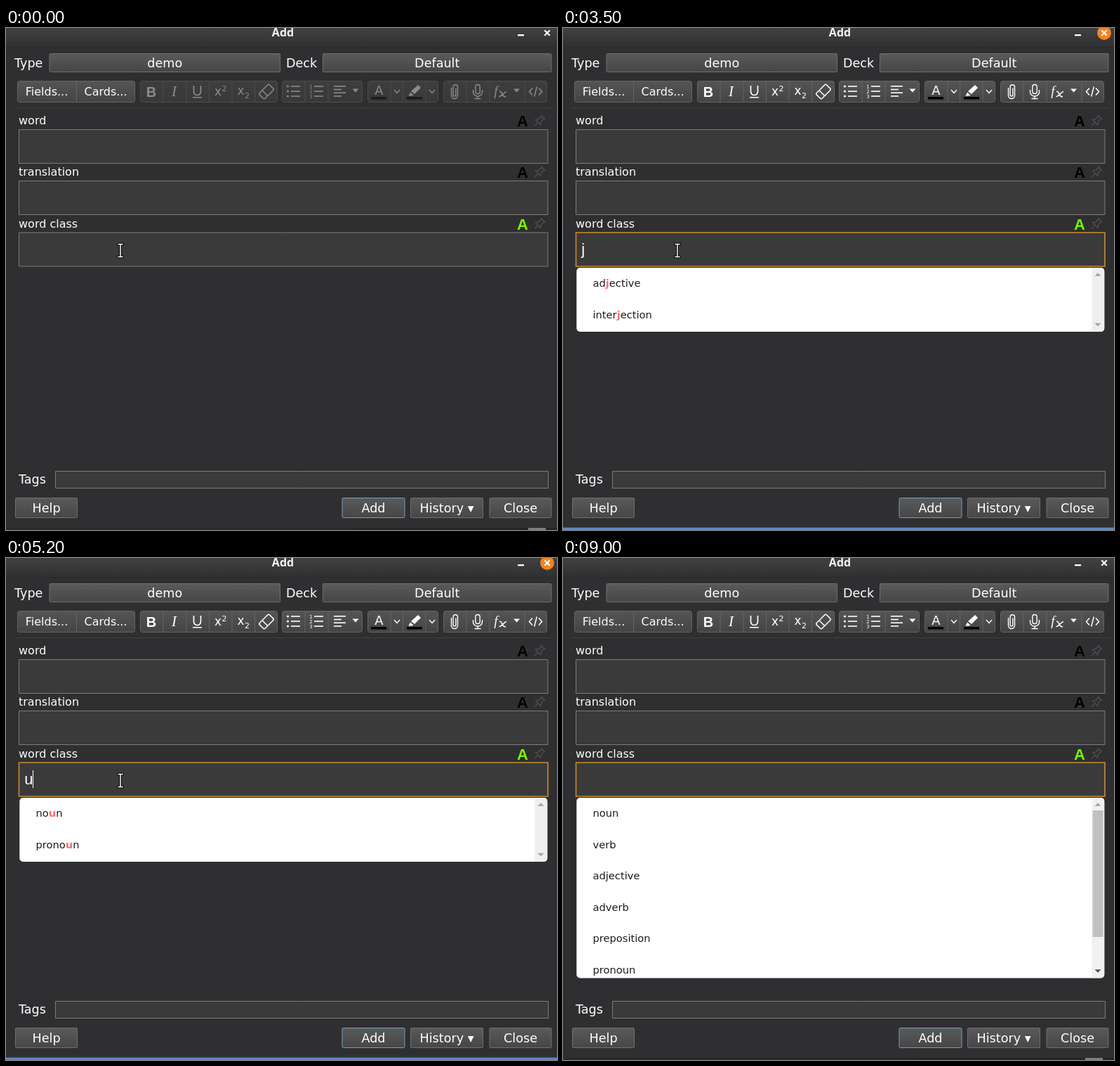
Recreate the animation shown at these times as an HTML page with a canvas. Size 785 by 714 pixels, loop 9.1 s.

```html
<!DOCTYPE html>
<html lang="en">
<head>
<meta charset="utf-8">
<title>Add</title>
<style>
html, body { margin: 0; width: 100%; height: 100%; overflow: hidden; background: #2f2f31; }
canvas { display: block; }
</style>
</head>
<body>
<canvas id="stage" width="785" height="714"></canvas>
<script>
const c = document.getElementById('stage').getContext('2d');
const LOOP = 9100;
const UI = '"DejaVu Sans", sans-serif';
const ARIAL = '"Liberation Sans", Arial, sans-serif';
const WORDS = ['noun', 'verb', 'adjective', 'adverb', 'preposition', 'pronoun', 'interjection'];

// [start, typed text, filter of the list]
const TYPING = [
  [0, '', ''], [1500, 'j', 'j'], [1600, 'je', 'je'], [3500, 'j', 'j'], [3700, '', ''],
  [5200, 'u', 'u'], [5500, 'un', 'un'], [7500, 'u', 'u'], [7600, '', 'u'], [7700, '', '']
];
const CARET_ON = [[700, 1300], [1500, 2200], [2800, 3400], [4000, 4600], [5200, 6000], [6700, 7300], [7800, 8400]];
// [start, x, y, shape]
const POINTER = [
  [0, 163, 316.5, 'beam'], [8400, 139, 236, 'beam'], [8500, 82, 88, 'arrow'],
  [8600, 44, 31, 'arrow'], [8700, 0, 0, 'none']
];

const at = (steps, t) => steps.filter(s => s[0] <= t).pop();

function text(s, x, y, font, color = '#fff', align = 'left') {
  c.font = font;
  c.fillStyle = color;
  c.textAlign = align;
  c.fillText(s, x, y);
  return c.measureText(s).width;
}

function rect(x, y, w, h, color) {
  c.fillStyle = color;
  c.fillRect(x, y, w, h);
}

function box(x, y, w, h, r, fill, stroke, line = 1) {
  c.beginPath();
  c.roundRect(x, y, w, h, r);
  if (fill) { c.fillStyle = fill; c.fill(); }
  if (stroke) { c.strokeStyle = stroke; c.lineWidth = line; c.stroke(); }
}

function path(points, color, width = 1.5, closed = false) {
  c.beginPath();
  points.forEach(([x, y]) => c.lineTo(x, y));
  if (closed) c.closePath();
  c.strokeStyle = color;
  c.lineWidth = width;
  c.stroke();
}

function shape(points, color) {
  c.beginPath();
  points.forEach(([x, y]) => c.lineTo(x, y));
  c.fillStyle = color;
  c.fill();
}

function svg(d, color, width = 1.5) {
  c.strokeStyle = color;
  c.lineWidth = width;
  c.stroke(new Path2D(d));
}

function around(x, y, angle, draw) {
  c.save();
  c.translate(x, y);
  c.rotate(angle);
  draw();
  c.restore();
}

function shade(y, h, top, bottom) {
  const g = c.createLinearGradient(0, y, 0, y + h);
  g.addColorStop(0, top);
  g.addColorStop(1, bottom);
  return g;
}

function button(label, x, y, w, h, border = '#707070') {
  box(x + .5, y + .5, w - 1, h - 1, 1.5, shade(y, h, '#5a5a5a', '#464646'), border);
  text(label, x + w / 2, y + h / 2 + 6, '17.6px ' + UI, '#fff', 'center');
}

function group(x, right, cuts, on) {
  const fill = on ? shade(75, 31, '#555555', '#444444') : shade(75, 31, '#3e3e3e', '#383838');
  const edge = on ? '#646464' : '#4c4c4c';
  box(x + .5, 75.5, right - x - 1, 30, 3, fill, edge);
  cuts.forEach(k => rect(k - .5, 76, 1, 29, edge));
}

const triangle = (x, y, color) => shape([[x - 4.5, y - 2.5], [x + 4.5, y - 2.5], [x, y + 2.5]], color);
const chevron = (x, color) => path([[x - 4, 88], [x, 92.5], [x + 4, 88]], color, 1.4);

function icons(on) {
  const ink = on ? '#fff' : '#8b8b8b';
  const bar = on ? '#000' : '#1b1b1b';
  const lines = (x, widths, y, step) => widths.forEach((w, i) => rect(x, y + i * step, w, 1.6, ink));

  text('B', 207, 97.5, 'bold 20px ' + ARIAL, ink, 'center');
  text('I', 239.5, 97, 'italic 21px "Liberation Serif", serif', ink, 'center');
  svg('M267.5 82V90.500a5 5 0 0 0 10 0V82', ink, 1.7);
  rect(266, 98, 13, 1.5, ink);
  text('x', 297, 96, '17px ' + UI, ink);
  text('2', 307.5, 90, '11px ' + UI, ink);
  text('x', 329.5, 95, '17px ' + UI, ink);
  text('2', 340, 100, '11px ' + UI, ink);
  around(371, 90.5, -Math.PI / 4, () => {
    box(-10, -5.5, 20, 11, 2, null, ink, 1.5);
    path([[-3, -5.5], [-3, 5.5]], ink);
  });

  [83, 90, 97].forEach((y, i) => {
    c.beginPath();
    c.arc(401.5, y, 1.6, 0, 7);
    c.fillStyle = ink;
    c.fill();
    text(i + 1, 434.5, y + 2.5, '7px ' + UI, ink, 'center');
  });
  lines(406, [13, 13, 13], 82.2, 7);
  lines(439, [13, 13, 13], 82.2, 7);
  lines(467, [17, 11, 17, 11], 82, 4.7);
  triangle(498, 89, ink);

  text('A', 531.5, 95, '18px ' + UI, ink, 'center');
  rect(520, 98, 22, 3.5, bar);
  chevron(557, ink);
  rect(571, 98, 22, 3.5, bar);
  shape([[577, 90], [587, 81], [591, 85], [582, 94]], ink);
  shape([[576, 91.5], [580.500, 95.500], [578, 96.5], [573.5, 96.5]], ink);
  chevron(607, ink);

  svg('M634.500 85V96a4.500 4.500 0 0 0 9 0V84a3.200 3.200 0 0 0 -6.400 0V95a1.900 1.900 0 0 0 3.800 0V85.500', ink, 1.4);
  box(668.8, 80.5, 6.4, 13, 3.2, null, ink, 1.4);
  svg('M665.500 88V91a6.500 6 0 0 0 13 0V88M672 97V100.500M667.500 100.500H676.500', ink, 1.4);
  text('f', 698, 96, 'italic 19px "Liberation Serif", serif', ink, 'center');
  svg('M703 90.500C707 88.500 706 99.500 712 97.500M713 90.500C710 90.500 706.500 97.500 702.500 97.500', ink, 1.5);
  triangle(727.5, 89, ink);
  path([[750, 85.5], [745.5, 90.5], [750, 95.5]], ink);
  path([[759, 85.5], [763.5, 90.5], [759, 95.5]], ink);
  path([[756.3, 83.5], [752.700, 97.5]], ink);
}

function toolbar(on, hover) {
  group(16, 184, [100.5], true);
  if (hover) box(17.5, 76.5, 82, 28, 3, '#636363');
  text('Fields...', 58, 96, '16px ' + UI, '#fff', 'center');
  text('Cards...', 142, 96, '16px ' + UI, '#fff', 'center');
  group(191, 387, [224, 257, 289.5, 322, 354.5], on);
  group(393, 508, [426, 459], on);
  group(515, 616, [548, 565.5, 598], on);
  group(623, 771, [656, 689, 739], on);
  icons(on);
  rect(12, 113, 767, 1, '#404042');
}

function titleBar(active) {
  rect(0, 0, 785, 27, shade(0, 27, '#414141', '#303032'));
  rect(0, 27, 785, 1, '#29292b');
  text('Add', 394.5, 12, 'bold 16px "Noto Sans", sans-serif', '#f4f4f4', 'center');
  rect(729, 9, 9, 2.3, '#fff');
  if (active) {
    c.beginPath();
    c.arc(771, 7, 10, 0, 7);
    c.fillStyle = '#f58220';
    c.fill();
  }
  path([[767.3, 3.3], [774.7, 10.7]], '#fff', 2.2);
  path([[774.7, 3.3], [767.3, 10.7]], '#fff', 2.2);
}

function pin(x, y) {
  around(x, y, Math.PI / 4, () =>
    svg('M-4 -8H4M-2.500 -8V-2L-5 2H5L2.500 -2V-8M0 2V9', '#515153', 1.3));
}

function field(label, y, mark, focused) {
  text(label, 18, y - 7, '16px ' + UI);
  text('A', 736, y - 4, 'bold 22px ' + ARIAL, mark, 'center');
  pin(759.5, y - 11.5);
  box(18.5, y + .5, 753.5, 48, 0, '#3a3a3a', focused ? '#c88d2e' : '#7c7c7c', focused ? 1.6 : 1);
}

function listArrow(y, dir, color) {
  shape([[757.5, y + 2.3 * dir], [766.5, y + 2.3 * dir], [762, y - 2.3 * dir]], color);
}

function dropdown(filter) {
  const items = WORDS.filter(w => w.includes(filter));
  const full = !filter;
  const bottom = full ? 597.5 : 432;
  c.save();
  box(19.3, 341, 752, bottom - 341, 5, '#fff');
  c.clip();
  rect(753.5, 341, 18, bottom - 341, full ? '#f1f1f1' : '#efefef');
  if (full) rect(754.5, 359, 15, 180, '#c1c1c1');
  listArrow(350.5, 1, '#a3a3a3');
  listArrow(full ? 587.5 : 422, -1, full ? '#505050' : '#a3a3a3');
  items.forEach((word, i) => {
    const y = 368 + i * 44.5;
    const k = word.indexOf(filter);
    const end = k + filter.length;
    let x = 42.5;
    x += text(word.slice(0, k), x, y, '14.67px ' + UI, '#1c1c1c');
    x += text(filter, x, y, 'bold 14.67px ' + UI, '#ff6f6f');
    text(word.slice(end), x, y, '14.67px ' + UI, '#1c1c1c');
  });
  c.restore();
}

function pointer(x, y, kind) {
  if (kind === 'beam') {
    const d = `M${x - 3} ${y - 9}H${x + 3}M${x - 3} ${y + 9}H${x + 3}M${x} ${y - 9}V${y + 9}`;
    c.lineCap = 'square';
    svg(d, '#000', 3.6);
    svg(d, '#fff', 1.5);
    c.lineCap = 'butt';
  } else if (kind === 'arrow') {
    const tip = [[0, 0], [0, 16], [4, 12.5], [6.5, 18], [9, 17], [6.5, 11.5], [11.5, 11.5]]
      .map(([a, b]) => [x + a, y + b]);
    shape(tip, '#111');
    path(tip, '#fff', 1, true);
  }
}

function footer(active) {
  text('Tags', 18, 648, '17.6px ' + UI);
  box(70.5, 630.5, 702, 24, 0, '#3a3a3a', '#7c7c7c');
  button('Help', 13, 668, 89, 29);
  button('Add', 478.5, 668, 90, 29, '#6ba3c4');
  button('History ▾', 576, 668, 104, 29);
  button('Close', 688.5, 668, 89, 29);
  if (active) {
    rect(0, 710.5, 785, 3.5, '#5c87c6');
  } else {
    rect(0, 711, 785, 3, '#242426');
    rect(0, 711, 502, 3, '#29292b');
    rect(744, 711, 25, 3, '#7b7f83');
  }
}

function draw(t) {
  const active = t >= 700 && t < 9000;
  const open = t >= 700;
  const [, typed, filter] = at(TYPING, t);
  const [, px, py, kind] = at(POINTER, t);

  rect(0, 0, 785, 714, '#2f2f31');
  titleBar(active);
  text('Type', 12, 55.5, '17.6px ' + UI);
  button('demo', 61.5, 36, 329.5, 27);
  text('Deck', 399, 55.5, '17.6px ' + UI);
  button('Default', 451, 36, 326.5, 27);
  toolbar(open, kind === 'arrow' && py > 75);

  field('word', 144, '#000', false);
  field('translation', 217, '#000', false);
  field('word class', 290.5, '#7cf500', open);
  const w = text(typed, 26.2, 322, '22px ' + ARIAL);
  if (CARET_ON.some(([a, b]) => t >= a && t < b)) rect(Math.floor(26.2 + w), 302, 1, 25, '#fff');

  footer(active);
  if (open) dropdown(filter);
  pointer(px, py, kind);
}

const start = performance.now();
function tick() {
  draw((performance.now() - start) % LOOP);
  requestAnimationFrame(tick);
}
tick();
</script>
</body>
</html>
```
